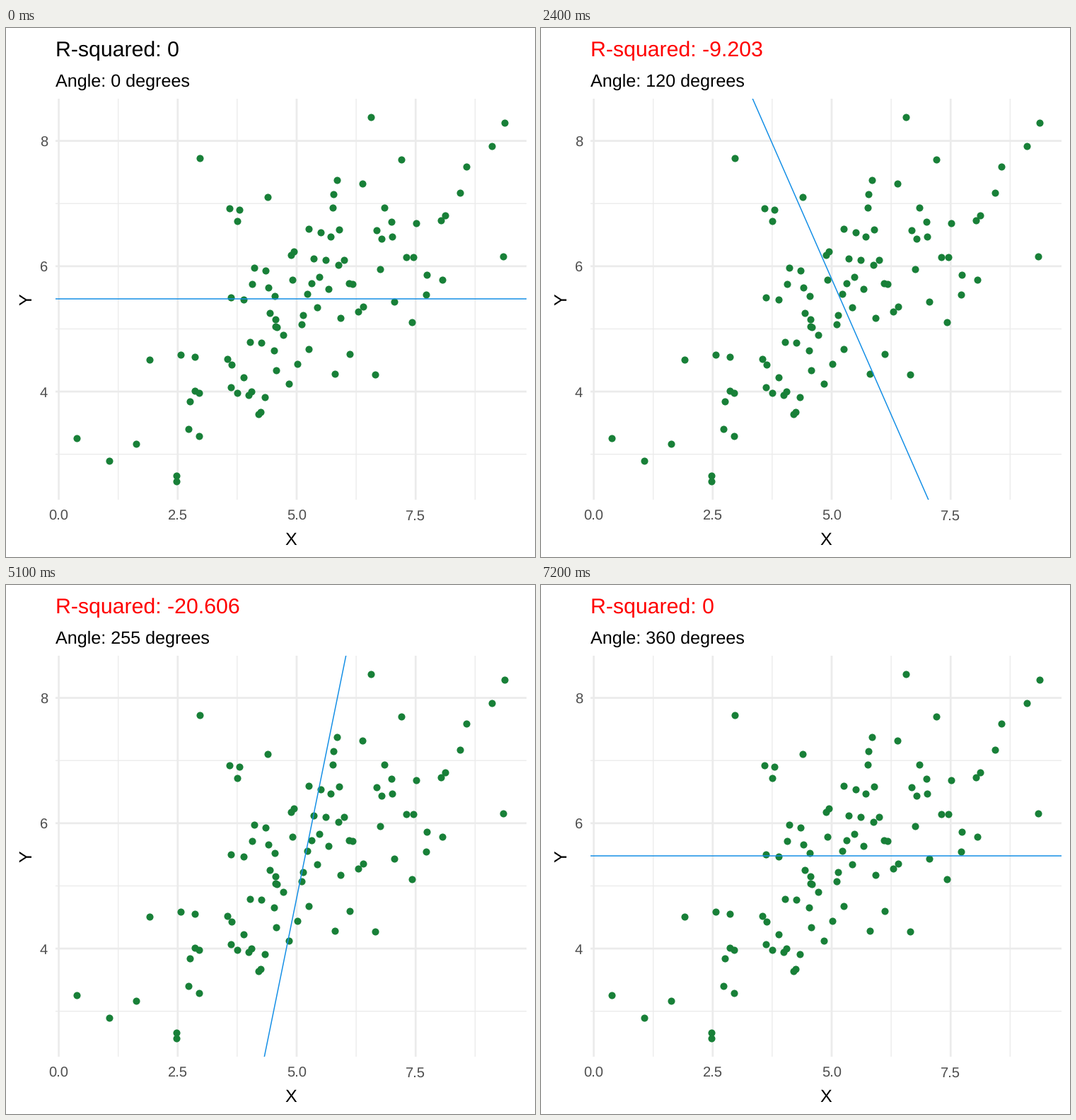
A matplotlib script for the animation above (7300 ms loop, 748 by 748 pixels).

```python
import math

import matplotlib.pyplot as plt
import numpy as np
from matplotlib.animation import FuncAnimation

SIZE, DPI = 748, 88
LEFT, RIGHT, TOP, BOTTOM = 70, 735.6, 100.2, 666.8
STEP = 5  # degrees per frame
FRAMES = 360 // STEP + 1

plt.rcParams.update({
    "font.family": "Liberation Sans",
    "text.hinting": "no_hinting",
    "axes.unicode_minus": False,
})


def pt(px):
    return px * 72 / DPI


def normal_quantile(p):
    z = 0.0
    for _ in range(40):
        cdf = 0.5 * (1 + math.erf(z / math.sqrt(2)))
        pdf = math.exp(-z * z / 2) / math.sqrt(2 * math.pi)
        z += (p - cdf) / pdf
    return z


def seeded_normals(seed, count):
    """Normal deviates by inversion from a scrambled Mersenne Twister."""
    state = []
    for _ in range(50 + 625):
        seed = (69069 * seed + 1) & 0xFFFFFFFF
        state.append(seed)
    twister = np.random.MT19937()
    twister.state = {
        "bit_generator": "MT19937",
        "state": {"key": np.array(state[51:], dtype=np.uint32), "pos": 624},
    }
    u = twister.random_raw(2 * count) * 2.3283064365386963e-10
    big = 2.0 ** 27
    p = (np.floor(big * u[::2]) + u[1::2]) / big
    return np.array([normal_quantile(v) for v in p])


def padded(values):
    lo, hi = values.min(), values.max()
    pad = 0.05 * (hi - lo)
    return lo - pad, hi + pad


noise = seeded_normals(123, 200)
x = 5 + 2 * noise[:100]
y = 3 + 0.5 * x + noise[100:]
mx, my = x.mean(), y.mean()
sxx = ((x - mx) ** 2).sum()
sxy = ((x - mx) * (y - my)).sum()
syy = ((y - my) ** 2).sum()
xlim, ylim = padded(x), padded(y)

fig = plt.figure(figsize=(SIZE / DPI, SIZE / DPI), dpi=DPI, facecolor="white")
ax = fig.add_axes([LEFT / SIZE, 1 - BOTTOM / SIZE,
                   (RIGHT - LEFT) / SIZE, (BOTTOM - TOP) / SIZE])
ax.set_xlim(*xlim)
ax.set_ylim(*ylim)
ax.axis("off")


def label(px, py, text, size, color="black", ha="left", **kw):
    return fig.text(px / SIZE, 1 - py / SIZE, text, fontsize=pt(size),
                    color=color, ha=ha, va="baseline", **kw)


def to_px(value, lim, start, end):
    return start + (value - lim[0]) / (lim[1] - lim[0]) * (end - start)


def grid(xs, ys, width):
    style = dict(color="#EBEBEB", lw=pt(width), snap=False, zorder=1)
    for v in xs:
        ax.axvline(v, **style)
    for v in ys:
        ax.axhline(v, **style)


grid((1.25, 3.75, 6.25, 8.75), (3, 5, 7), 1.3)
grid((0, 2.5, 5, 7.5), (4, 6, 8), 2.7)
ax.scatter(x, y, s=pt(10.1) ** 2, color="#188038", lw=0, zorder=2)

for v in (0, 2.5, 5, 7.5):
    label(to_px(v, xlim, LEFT, RIGHT), 696, f"{v:.1f}", 20.2, "#4D4D4D", "center")
for v in (4, 6, 8):
    label(59, to_px(v, ylim, BOTTOM, TOP) + 8.3, str(v), 20.2, "#4D4D4D", "right")
label((LEFT + RIGHT) / 2, 731, "X", 25.15, ha="center")
label(36, (TOP + BOTTOM) / 2, "Y", 25.15, ha="center",
      rotation=90, rotation_mode="anchor")

title = label(LEFT, 40, "", 30.25)
subtitle = label(LEFT, 83, "", 25.15)
line, = ax.plot([], [], color="#148FE6", lw=pt(1.5), zorder=3)


def draw(frame):
    angle = STEP * frame
    slope = math.tan(math.radians(angle))
    r2 = (2 * slope * sxy - slope ** 2 * sxx) / syy
    title.set_text(f"R-squared: {round(r2, 3) + 0.0:.15g}")
    title.set_color("red" if r2 < 0 else "black")
    subtitle.set_text(f"Angle: {angle} degrees")
    # Run along the steeper axis so that near-vertical slopes stay finite.
    reach = np.array([-10, 10])
    if abs(slope) > 1:
        line.set_data(mx + reach / slope, my + reach)
    else:
        line.set_data(mx + reach, my + reach * slope)
    return title, subtitle, line


anim = FuncAnimation(fig, draw, frames=FRAMES, interval=100, repeat=True,
                     repeat_delay=0, blit=False)
plt.show()
```
